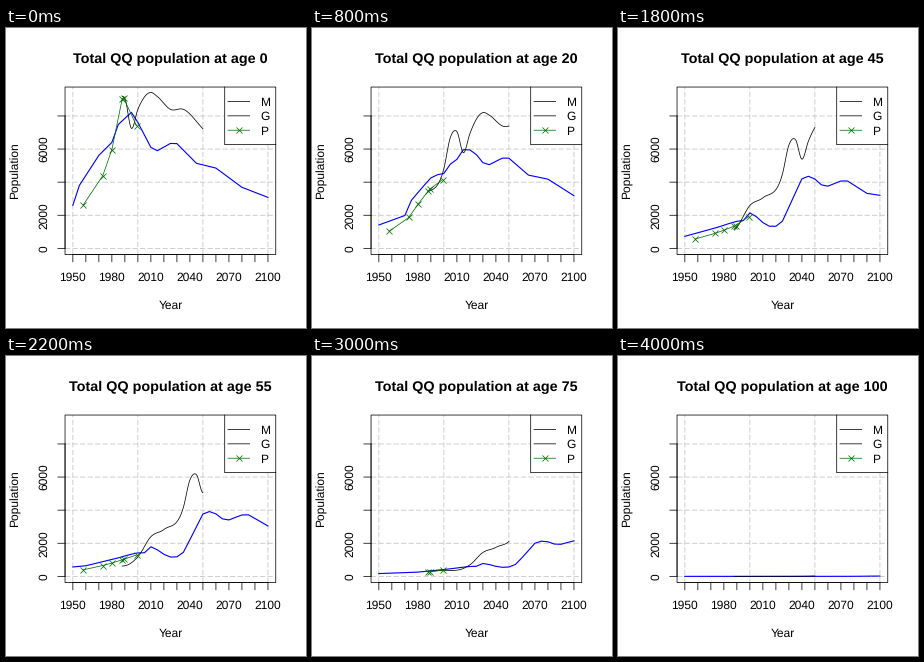
A matplotlib script for the animation above (4200 ms loop, 300 by 300 pixels).

```python
import numpy as np
import matplotlib.pyplot as plt
from matplotlib.animation import FuncAnimation
from matplotlib.patches import Rectangle

plt.rcParams["font.family"] = "Liberation Sans"
plt.rcParams["font.size"] = 12
plt.rcParams["text.hinting"] = "no_hinting"

# Layout in pixels, y pointing down
LEFT, RIGHT, TOP, BOTTOM = 59.04, 269.76, 59.04, 226.56
LEGEND_LEFT = 218.7
LINE = 14.4
THIN = 0.75
GREEN = "#007000"

# Turning points of yearly births; other ages follow from mortality
BLUE_BIRTHS = {
    1850: 400, 1905: 1060, 1930: 1850, 1950: 2600, 1955: 3800, 1970: 5620,
    1980: 6400, 1985: 7490, 1995: 8215, 2000: 7610, 2010: 6100, 2015: 5900,
    2025: 6340, 2030: 6330, 2045: 5140, 2060: 4850, 2080: 3690, 2100: 3080,
}
BLACK_BIRTHS = {
    1860: 350, 1923: 950, 1940: 1250, 1945: 1800, 1955: 3650, 1965: 4300,
    1980: 6280, 1985: 8700, 1990: 9060, 1995: 7250, 2000: 8400, 2010: 9420,
    2015: 9170, 2025: 8400, 2035: 8400, 2050: 7230,
}
# Census year and the oldest age it reports
CENSUSES = {1958: 70, 1973: 70, 1980: 70, 1988: 85, 1989: 80, 1999: 80}

BLUE_X = np.arange(1950, 2101, 5)
BLACK_X = np.arange(1988, 2050.1, 0.5)


def px_x(year):
    return 66.84 + (np.asarray(year) - 1950) * 1.3007


def px_y(people):
    return 220.36 - np.asarray(people) * 0.01655


def logistic(x):
    return 1 / (1 + np.exp(-x))


def bell(x):
    return np.exp(-x * x / 2)


def smooth(x, knots, values):
    """Cubic Hermite curve through the knots."""
    slope = np.gradient(values, knots)
    i = np.clip(np.searchsorted(knots, x, side="right") - 1, 0, len(knots) - 2)
    h = knots[i + 1] - knots[i]
    u = (x - knots[i]) / h
    return ((1 + 2 * u) * (1 - u) ** 2 * values[i] + u * (1 - u) ** 2 * h * slope[i]
            + u * u * (3 - 2 * u) * values[i + 1] + u * u * (u - 1) * h * slope[i + 1])


def hazard(age, year, epidemic, ageing):
    child = (0.025 + 0.035 * logistic((2003 - year) / 4)) * np.exp(-age / 4)
    old = (0.022 + 0.018 * logistic((2045 - year) / 18)) * np.exp(0.085 * (age - 65))
    wave = 0.075 * bell((year - 2004) / 7) + 0.012 * logistic((year - 2000) / 4)
    return 0.0012 + child + ageing * old + epidemic * wave * bell((age - 31) / 8)


def survivors(births, curve, years, age, epidemic, ageing):
    """People of one age in each year, from their birth cohort."""
    born = np.asarray(years) - age
    knots = np.array(list(births))
    lived = np.arange(age)[:, None] + 0.5
    loss = hazard(lived, born + lived, epidemic, ageing).sum(axis=0)
    return curve(born, knots, np.array(list(births.values()))) * np.exp(-loss)


def blue_at(years, age):
    return survivors(BLUE_BIRTHS, np.interp, years, age, epidemic=1, ageing=1)


def black_at(years, age):
    return survivors(BLACK_BIRTHS, smooth, years, age, epidemic=0, ageing=0.6)


def census_at(age):
    """Census years reporting this age, and their counts."""
    years = np.array([year for year, oldest in CENSUSES.items() if age <= oldest])
    coverage = np.interp(years, [1958, 1999], [0.63, 0.92])
    infants = 0.4 * np.exp(-((years - 1987) / 8) ** 2 - age / 5)
    return years, coverage * (1 + infants) * blue_at(years, age)


fig = plt.figure(figsize=(300 / 72, 300 / 72), dpi=72, facecolor="white")
ax = fig.add_axes([0, 0, 1, 1])
ax.set(xlim=(0, 300), ylim=(300, 0))
ax.axis("off")


def line(x, y, color="black", width=THIN, **kw):
    return ax.plot(x, y, color=color, lw=width, snap=False, **kw)[0]


def label(x, y, text, **kw):
    return ax.text(x, y, text, va="baseline", rotation_mode="anchor",
                   **{"ha": "center", **kw})


def frame(x, y, w, h, **kw):
    ax.add_patch(Rectangle((x, y), w, h, lw=THIN, snap=False, **kw))


# Grid, box and axes
dash = dict(color="#c0c0c0", linestyle=(0, (7, 3)), dash_capstyle="butt", zorder=1)
for year in range(1950, 2101, 50):
    line([px_x(year)] * 2, [BOTTOM, TOP], **dash)
for count in range(0, 8001, 2000):
    line([LEFT, RIGHT], [px_y(count)] * 2, **dash)
    line([LEFT - 7.2, LEFT], [px_y(count)] * 2)
for year in range(1950, 2101, 10):
    line([px_x(year)] * 2, [BOTTOM, BOTTOM + 7.2])
frame(LEFT, TOP, RIGHT - LEFT, BOTTOM - TOP, fc="none", ec="black", zorder=7)
line([LEFT] * 2, px_y([0, 8000]))
line(px_x([1950, 2100]), [BOTTOM] * 2)

middle_x, middle_y = (LEFT + RIGHT) / 2, (TOP + BOTTOM) / 2
for year in range(1950, 2101, 30):
    label(px_x(year), BOTTOM + 1.8 * LINE, str(year))
for count in (0, 2000, 6000):
    label(LEFT - 1.2 * LINE, px_y(count), str(count), rotation=90)
label(middle_x, BOTTOM + 3.8 * LINE, "Year")
label(LEFT - 3.2 * LINE, middle_y, "Population", rotation=90)
title = label(middle_x, 35, "", fontsize=14.4, fontweight="bold")

# Series
cross = dict(marker="x", markersize=6, markeredgewidth=THIN)
blue = line([], [], "blue", 1.125, zorder=3)
black = line([], [], zorder=4)
census = line([], [], GREEN, zorder=5, **cross)

# Legend, sharing its top and right edges with the box
legend_bottom = TOP + 4 * LINE
frame(LEGEND_LEFT, TOP, RIGHT - LEGEND_LEFT, 4 * LINE, fc="white", ec="none", zorder=6)
line([LEGEND_LEFT, LEGEND_LEFT, RIGHT], [TOP, legend_bottom, legend_bottom], zorder=7)
for row, (name, color) in enumerate([("M", "black"), ("G", "black"), ("P", GREEN)], 1):
    y = TOP + row * LINE
    line([222, 243.6], [y, y], color, zorder=7)
    label(254.3, y + 4.4, name, ha="left", zorder=7)
line([232.8], [TOP + 3 * LINE], GREEN, zorder=7, **cross)


def update(step):
    age = 5 * step
    title.set_text(f"Total QQ population at age {age}")
    blue.set_data(px_x(BLUE_X), px_y(blue_at(BLUE_X, age)))
    black.set_data(px_x(BLACK_X), px_y(black_at(BLACK_X, age)))
    years, counts = census_at(age)
    census.set_data(px_x(years), px_y(counts))
    return title, blue, black, census


anim = FuncAnimation(fig, update, frames=21, interval=200, repeat=True, repeat_delay=0)
plt.show()
```
